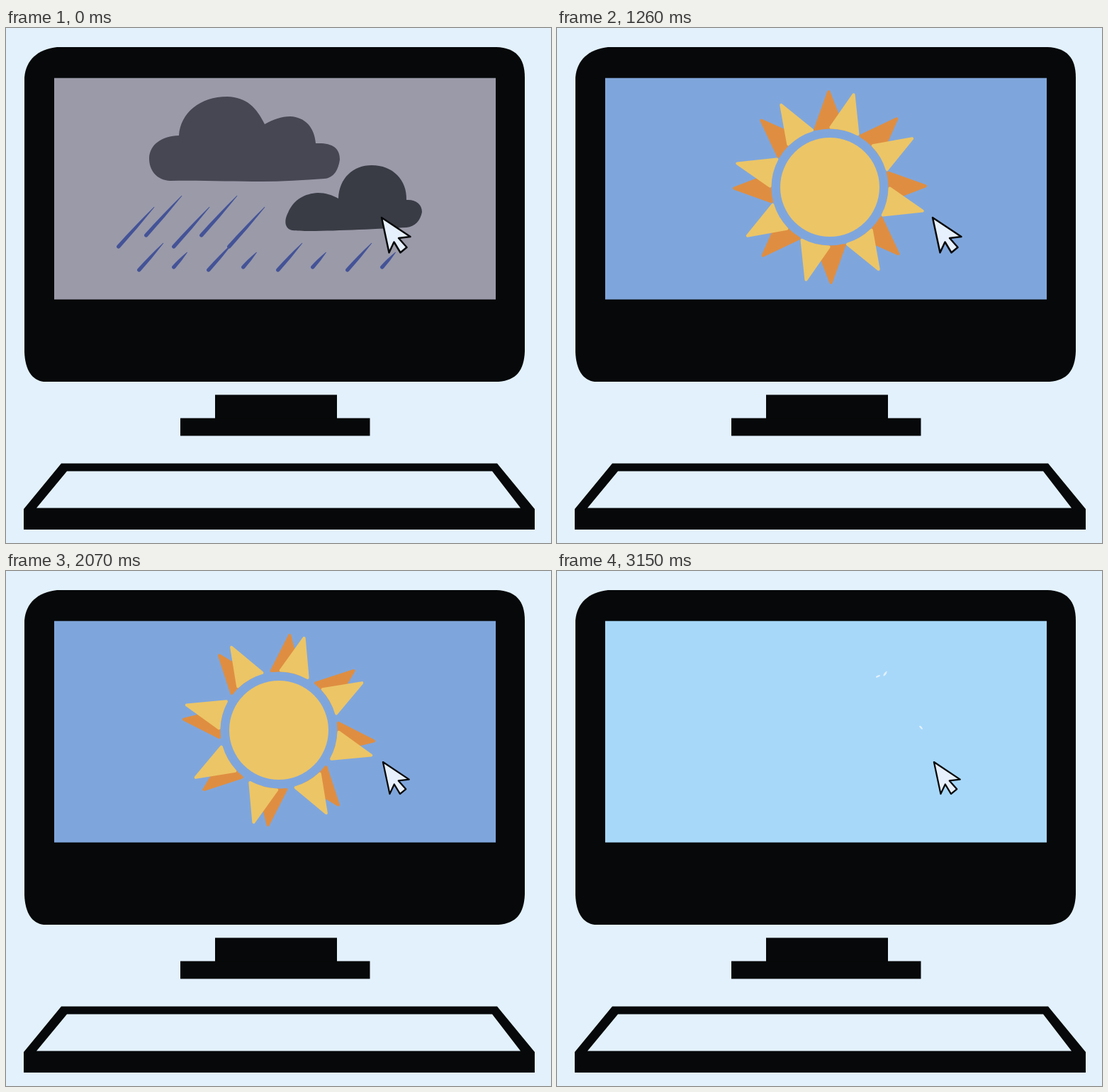
Write an HTML page with a canvas that moves like this. It is 769x728 px and loops after 3240 ms.

```html
<!DOCTYPE html>
<html lang="en">
<head>
<meta charset="utf-8">
<title>Weather on a screen</title>
<style>
  html, body { margin: 0; width: 100%; height: 100%; overflow: hidden; background: #e3f1fd; }
  canvas { display: block; }
</style>
</head>
<body>
<canvas id="stage" width="769" height="728"></canvas>
<script>
const ctx = document.getElementById('stage').getContext('2d');
const STEP = 90, SCENE = 12;
const INK = '#060809', PAPER = '#e3f1fd';
const clamp = v => Math.max(0, Math.min(1, v));

function fill(path, color, rule = 'nonzero') {
  ctx.fillStyle = color;
  ctx.fill(new Path2D(path), rule);
}

function box(x, y, w, h, color) {
  ctx.fillStyle = color;
  ctx.fillRect(x, y, w, h);
}

const MONITOR = 'M72 27H692C719 28 732 42 732 70V457C731 484 720 498 695 500H53C37 498 27 484 26 458V70C28 45 45 30 72 27Z';
const KEYBOARD = 'M78 615.5H693L746 680V709H25V680ZM86 626.5H686L726 678.5H43Z';
const CURSOR = 'M530 268L570.5 295L554 297L565.5 310L556.5 317.5L547.5 302.5L540.5 317.5Z';
const BIG_CLOUD = 'M232 216C212 215 202 201 202 184C203 164 220 153 244 152C246 120 274 97 312 97C340 98 353 112 365 136C378 129 388 125 401 125C422 126 435 140 437 163C460 162 471 169 471 186C469 200 463 212 449 213C420 215 390 217 360 217C320 217 270 215 232 216Z';
const SMALL_CLOUD = 'M404 286C393 284 392 272 398 261C406 242 422 234 440 233C451 233 460 236 469 241C470 212 490 194 516 194C546 194 566 215 565 243C578 242 587 249 587 260C585 272 577 281 565 282C520 284 430 289 404 286Z';

// Evenly spaced drops, alternating in height and sitting a little up or down.
const row = (x, y, gap, count, tall, short = tall, sway = 5) =>
  Array.from({ length: count }, (_, i) => {
    const odd = i % 2;
    return { x: x + i * gap, y: y + (odd ? -sway : sway), h: odd ? short : tall };
  });

const SHOWER = [...row(157, 303, 39, 5, 58, 58, 8), ...row(186, 342, 49, 8, 40, 23, 2)];
const DRIZZLE = [
  ...row(197, 240, 47, 5, 16, 14),
  ...row(210, 262, 57, 2, 14),
  ...row(173, 299, 55, 4, 20, 32),
  ...row(210, 336, 32, 10, 20),
  ...row(118, 357, 70, 6, 6, 14, 4)
];

function drop({ x, y, h }, frames) {
  const lean = .9, fall = frames * 13;
  const top = x > 400 ? 294 : 224, floor = 367;
  const head = Math.min(y + fall, floor);
  const tail = Math.max(y + fall - h, top);
  const size = head - tail;
  if (size < 2) return;
  const r = Math.min(2.7, 1.4 + size / 10), length = size * Math.hypot(1, lean);
  ctx.save();
  ctx.translate(x - (head - y) * lean, head);
  ctx.rotate(Math.atan2(-1, lean));
  ctx.beginPath();
  ctx.arc(r, 0, r, Math.PI / 2, -Math.PI / 2);
  ctx.quadraticCurveTo(length / 2, -r, length, -.4);
  ctx.lineTo(length, .4);
  ctx.quadraticCurveTo(length / 2, r, r, r);
  ctx.fill();
  ctx.restore();
}

function rain(t) {
  ctx.fillStyle = '#445397';
  SHOWER.forEach(d => drop(d, t));
  DRIZZLE.forEach(d => drop(d, t - 11));
  fill(BIG_CLOUD, '#464752');
  fill(SMALL_CLOUD, '#3a3c45');
}

function rays(degrees, color) {
  const base = .235;
  ctx.fillStyle = ctx.strokeStyle = color;
  ctx.lineWidth = 4;
  for (let i = 0; i < 8; i++) {
    ctx.save();
    ctx.translate(385, 225);
    ctx.rotate((degrees + i * 45) * Math.PI / 180);
    ctx.beginPath();
    ctx.moveTo(0, -135);
    ctx.arc(0, 0, 84.5, base - Math.PI / 2, -base - Math.PI / 2, true);
    ctx.closePath();
    ctx.fill();
    ctx.stroke();
    ctx.restore();
  }
}

function sun(t) {
  rays(-13.6 + 6.58 * t - .06 * t * t, '#df8e41');
  rays(26.95 - 6.525 * t + .125 * t * t, '#ecc566');
  ctx.beginPath();
  ctx.arc(385, 225, 70, 0, 7);
  ctx.fill();
}

// Gusts: curve, drift to the right, share erased by the end
const GUSTS = [
  ['M133 286C160 276 205 222 251 203', 204, .97],
  ['M166 288C200 277 235 240 270 221C300 207 320 198 333 178', 132, .97],
  ['M209 291C235 278 265 250 305 237C365 219 410 207 484 175', 130, 1],
  ['M233 291C262 271 290 257 320 257C352 258 368 270 361 284', 130, 1],
  ['M213 321C240 313 275 289 310 286C325 285 338 290 343 296', 130, 1],
  ['M268 308C285 301 303 299 322 304', 130, 1],
  ['M343 242C357 243 368 250 377 260', 138, .9]
].map(([d, ...rest]) => {
  const path = document.createElementNS('http://www.w3.org/2000/svg', 'path');
  path.setAttribute('d', d);
  return [path, ...rest];
});

function wind(t) {
  const grown = clamp((t + 1) / 6);
  const gone = clamp((t - 5) / 6) ** 1.5;
  const early = Math.min(0, t - 5) * 4;
  ctx.strokeStyle = '#e3f1fc';
  for (const [path, drift, erased] of GUSTS) {
    const total = path.getTotalLength();
    const from = total * gone * erased, span = total * grown - from;
    if (span < .5) continue;
    const steps = Math.ceil(span / 3);
    const at = s => path.getPointAtLength(from + span * s);
    ctx.save();
    ctx.translate(early + drift * gone, -early - drift * gone * .27);
    for (let i = 0; i < steps; i++) {
      const s = (i + .5) / steps, a = at(i / steps), b = at((i + 1) / steps);
      const taper = Math.min(1, .25 + (1 - s) * 2.5);
      ctx.lineWidth = 5.3 * (.6 + .4 * Math.sin(Math.PI * s)) * taper * Math.min(1, .4 + span / 60);
      ctx.beginPath();
      ctx.moveTo(a.x, a.y);
      ctx.lineTo(b.x, b.y);
      ctx.stroke();
    }
    ctx.restore();
  }
}

function cursor(t) {
  const scale = 1 - .09 * clamp((t - 8) / 2);
  ctx.save();
  ctx.translate(551, 291);
  ctx.scale(scale, scale);
  ctx.translate(-551, -291);
  fill(CURSOR, '#e7f0fd');
  ctx.strokeStyle = INK;
  ctx.lineWidth = 2.5;
  ctx.stroke(new Path2D(CURSOR));
  ctx.restore();
}

const SCENES = [['#9a9aa9', rain], ['#7fa6dc', sun], ['#a7d8fa', wind]];

function draw() {
  const frame = Math.floor(performance.now() / STEP) % (SCENE * SCENES.length);
  const t = frame % SCENE;
  const [sky, weather] = SCENES[Math.floor(frame / SCENE)];
  ctx.lineJoin = ctx.lineCap = 'round';
  box(0, 0, 769, 728, PAPER);
  fill(MONITOR, INK);
  box(295, 518.5, 172, 34, INK);
  box(246, 551.5, 267.5, 25, INK);
  fill(KEYBOARD, INK, 'evenodd');
  box(68, 70.7, 623, 313, sky);
  weather(t);
  cursor(t);
  requestAnimationFrame(draw);
}
draw();
</script>
</body>
</html>
```
